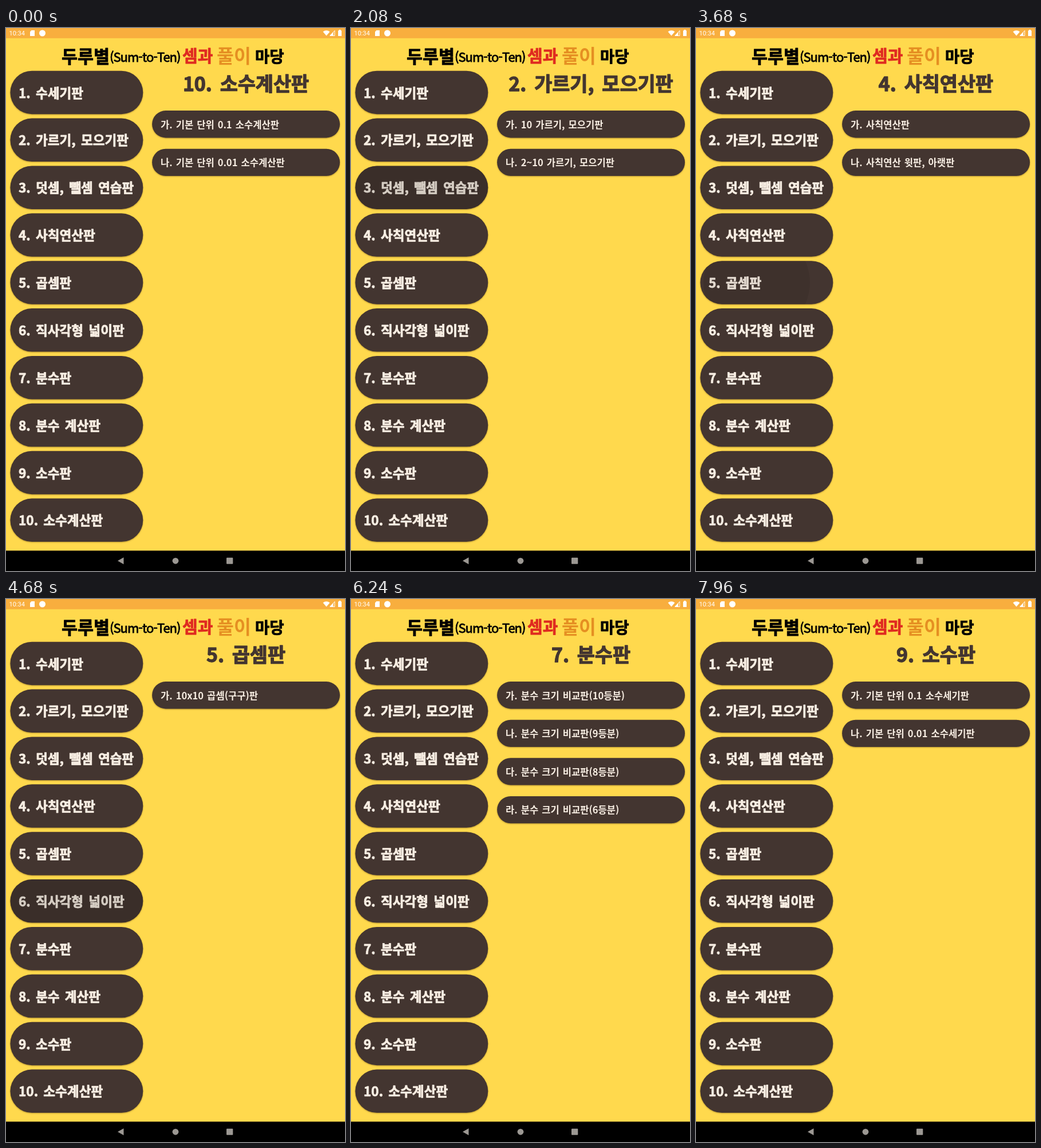
Write an HTML page that moves like this. It is 592 by 947 pixels and loops after 8000 ms.

```html
<!DOCTYPE html>
<html lang="ko">
<head>
<meta charset="utf-8">
<title>셈 교구 메뉴</title>
<style>
  html, body { margin: 0; width: 100%; height: 100%; overflow: hidden; background: #ffd94d; }
  svg { display: block; width: 100vw; height: 100vh; }
  text { font-family: "Noto Sans CJK KR", "Noto Sans CJK JP", "Noto Sans CJK", sans-serif; font-weight: 700; word-spacing: .13em; white-space: pre; stroke-linejoin: round; }
  .pill { fill: #433530; filter: drop-shadow(0 1.2px 1.2px rgba(70, 40, 0, .4)); }
  .menu { font-size: 22.6px; fill: #f8eee3; stroke: #f8eee3; stroke-width: .8px; }
  .heading { font-size: 33.8px; fill: #433530; stroke: #433530; stroke-width: 1.3px; text-anchor: middle; }
  .item { font-size: 16.6px; fill: #f8eee3; word-spacing: .08em; }
  .brand { stroke-width: .8px; }
  .clock { font: 11px Roboto, sans-serif; fill: #fff; }
</style>
</head>
<body>
<svg id="stage" viewBox="0 0 592 947" preserveAspectRatio="none">
  <defs><clipPath id="clip"><rect id="mask" x="7.4" width="231.9" height="75.5" rx="37.75"/></clipPath></defs>
  <rect width="592" height="947" fill="#ffd94d"/>
  <rect width="592" height="17.8" fill="#f8ae3e"/>

  <text class="clock" x="5.5" y="13">10:34</text>
  <g fill="#fff">
    <path d="M44.5 4H50V14H42V6.5z"/>
    <circle cx="63.5" cy="9" r="5.5"/>
    <path d="M553.5 6.5Q559.5 2 565.5 6.5L559.5 13.5z"/>
    <path d="M571.5 6.7V13.5H565z"/>
    <path d="M574 4.5V13.5H566z" fill="none" stroke="#fff"/>
    <path d="M580 4.5h1.5V3h3v1.5H586V14h-6z"/>
  </g>

  <g class="brand">
    <text x="97" y="60.5" font-size="30.5" stroke="#000">두루별</text>
    <text x="181" y="59" font-size="22" style="font-weight: 400" letter-spacing="-1" stroke="#000">(Sum-to-Ten)</text>
    <text x="308" y="60" font-size="29" fill="#df2a20" stroke="#df2a20">셈과</text>
    <text x="368" y="60.5" font-size="32.5" fill="#e58f22">풀이</text>
    <text x="435" y="59.5" font-size="27.5" stroke="#000">마당</text>
  </g>

  <g id="menu"></g>
  <g id="pages"></g>
  <g clip-path="url(#clip)"><circle id="ripple" fill="#000"/></g>

  <rect y="911.5" width="592" height="35.5"/>
  <g fill="#9c9893">
    <path d="M195 929.3L205.5 923.3V935.3z"/>
    <circle cx="296" cy="929.3" r="5.4"/>
    <rect x="385" y="923.8" width="11.3" height="11" rx="1"/>
  </g>
</svg>
<script>
const LOOP = 8000;
const HOLD = 340, FADE = 150;
const BUTTON = { x: 7.4, width: 231.9, height: 75.5 };
const menu = [
  ['수세기판', '100 수세기판', '100 숫자세기판', '100 순서세기판', '10씩 뛰어세기판', '100씩 뛰어세기판'],
  ['가르기, 모으기판', '10 가르기, 모으기판', '2~10 가르기, 모으기판'],
  ['덧셈, 뺄셈 연습판', '덧셈 연습판', '뺄셈 연습판'],
  ['사칙연산판', '사칙연산판', '사칙연산 윗판, 아랫판'],
  ['곱셈판', '10x10 곱셈(구구)판'],
  ['직사각형 넓이판', '직사각형 넓이판'],
  ['분수판', ...[10, 9, 8, 6].map(n => `분수 크기 비교판(${n}등분)`)],
  ['분수 계산판', ...[10, 9, 8, 6].map(n => `분수 계산판(${n}등분)`)],
  ['소수판', '기본 단위 0.1 소수세기판', '기본 단위 0.01 소수세기판'],
  ['소수계산판', '기본 단위 0.1 소수계산판', '기본 단위 0.01 소수계산판'],
];
// When each button is pressed, top to bottom; its page opens on release.
const presses = [330, 1130, 1950, 2800, 3645, 4470, 5400, 6540, 7480];

const byId = id => document.getElementById(id);
const buttonTop = i => 74.7 + i * 82.88;

function set(node, attrs) {
  for (const key in attrs) node.setAttribute(key, attrs[key]);
  return node;
}

function add(parent, tag, attrs, text = '') {
  const node = set(document.createElementNS('http://www.w3.org/2000/svg', tag), attrs);
  node.textContent = text;
  return parent.appendChild(node);
}

function pill(parent, box) {
  add(parent, 'rect', { class: 'pill', rx: box.height / 2, ...box });
}

const pages = menu.map(([name, ...items], i) => {
  const label = `${i + 1}. ${name}`;
  const y = buttonTop(i);
  pill(byId('menu'), { ...BUTTON, y });
  add(byId('menu'), 'text', { class: 'menu', x: 22, y: y + 46.8 }, label);

  const page = add(byId('pages'), 'g', {});
  add(page, 'text', { class: 'heading', x: 419, y: 110 }, label);
  items.forEach((item, k) => {
    const top = 144.1 + k * 66.6;
    pill(page, { x: 255.1, y: top, width: 328, height: 47.3 });
    add(page, 'text', { class: 'item', x: 270, y: top + 30.4 }, `${'가나다라마'[k]}. ${item}`);
  });
  return page;
});

const clamp = v => Math.min(1, Math.max(0, v));

function draw() {
  const t = performance.now() % LOOP;
  const opened = presses.filter(start => t >= start + HOLD).length;
  const current = opened ? opened - 1 : menu.length - 1;
  pages.forEach((page, i) => set(page, { visibility: i === current ? 'visible' : 'hidden' }));

  const active = presses.findIndex(start => t >= start && t < start + HOLD + FADE);
  let opacity = 0;
  if (active >= 0) {
    const age = t - presses[active];
    const grow = 1 - (1 - clamp(age / 225)) ** 3.4;
    const y = buttonTop(active);
    opacity = .14 * clamp(age / 60) * (1 - clamp((age - HOLD) / FADE));
    set(byId('mask'), { y });
    set(byId('ripple'), { cx: 92 + 31.5 * grow, cy: y + BUTTON.height / 2, r: 69 + 53 * grow });
  }
  set(byId('ripple'), { opacity });
  requestAnimationFrame(draw);
}
draw();
</script>
</body>
</html>
```
